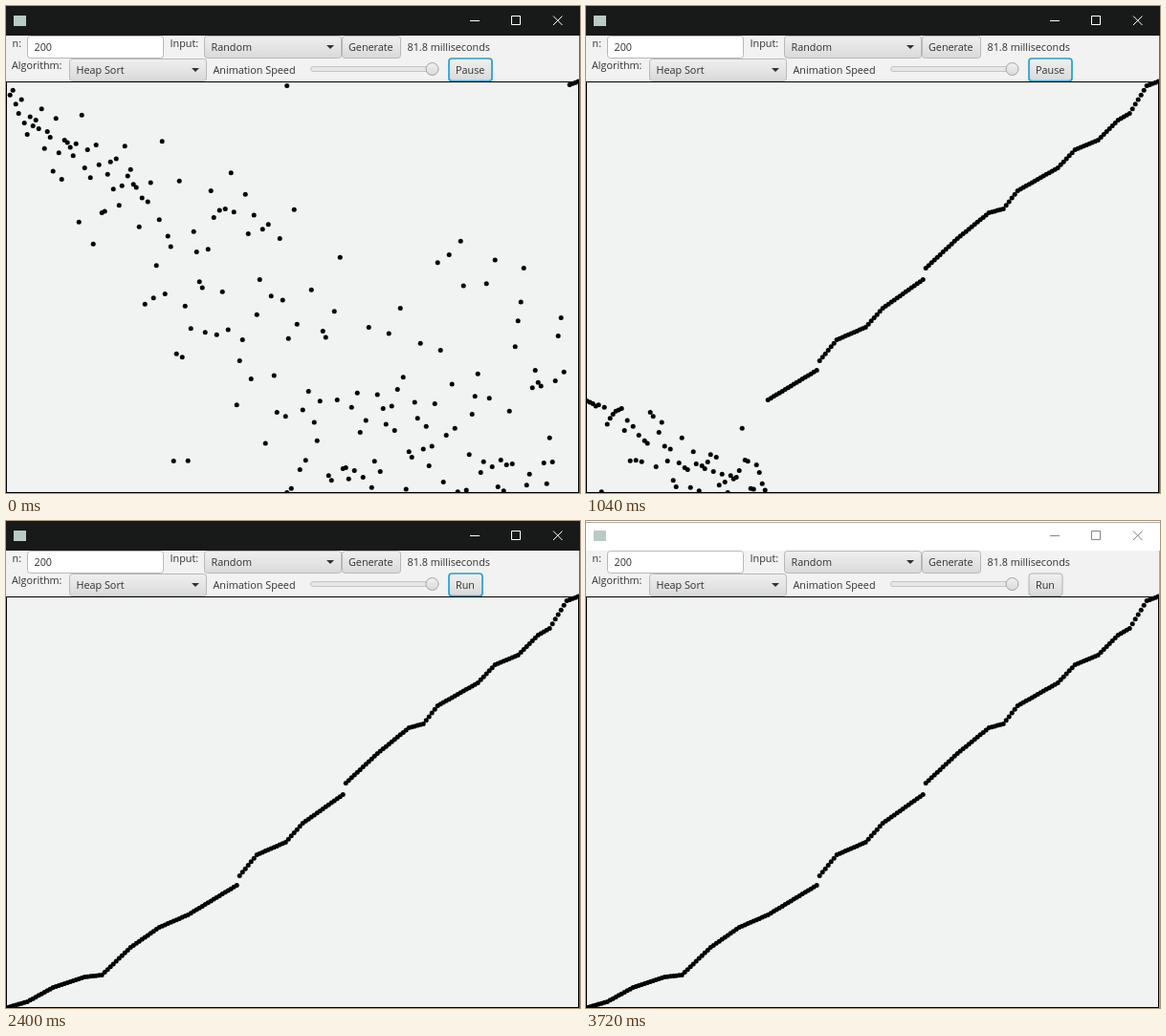
An HTML page with a canvas that plays this animation: 600 px wide and 510 px high, repeating every 3.76 s.

```html
<!DOCTYPE html>
<html lang="en">
<head>
<meta charset="utf-8">
<title>Heap Sort</title>
<style>
  html, body { margin: 0; width: 600px; height: 510px; overflow: hidden; }
  canvas { display: block; }
</style>
</head>
<body>
<canvas width="600" height="510"></canvas>
<script>
const ctx = document.querySelector('canvas').getContext('2d');
const LOOP = 3760, TICK = 40, BLUR_AT = 3600, COUNT = 200;

// Piecewise linear curve through [x, y] points
function curve(points, x) {
  let i = 0;
  while (i < points.length - 2 && x > points[i + 1][0]) i++;
  const [[x0, y0], [x1, y1]] = points.slice(i, i + 2);
  return y0 + (y1 - y0) * (x - x0) / (x1 - x0);
}

let seed = 11;
const random = () => (seed = seed * 16807 % 2147483647) / 2147483647;

// Height of the dots once sorted; a smaller y is a larger value.
const slope = [
  [0, 509], [7, 503], [16, 488], [27, 477], [33, 475], [43, 446], [53, 425], [63, 412],
  [80, 381], [81, 371], [87, 349], [97, 336], [103, 316], [117, 286], [118, 274], [129, 243],
  [140, 216], [145, 212], [150, 193], [164, 169], [170, 150], [178, 140], [185, 119],
  [189, 112], [195, 83], [199, 78.5]
];
const heap = Array.from({ length: COUNT }, (_, i) => curve(slope, i));

const swaps = [];
function swap(a, i, j) {
  [a[i], a[j]] = [a[j], a[i]];
  swaps.push([i, j]);
}
function siftDown(a, i, size) {
  for (let child; (child = 2 * i + 1) < size; i = child) {
    if (child + 1 < size && a[child + 1] < a[child]) child++;
    if (a[child] >= a[i]) return;
    swap(a, i, child);
  }
}

for (let i = COUNT - 1; i > 0; i--) swap(heap, i, Math.floor(random() * (i + 1)));
for (let i = COUNT / 2 - 1; i >= 0; i--) siftDown(heap, i, COUNT);
swaps.length = 0;

// Sort once, noting how many swaps each dot's final placement took.
const work = heap.slice(), placed = [];
for (let end = COUNT - 1; end > 0; end--) {
  swap(work, 0, end);
  placed[end] = swaps.length;
  siftDown(work, 0, end);
}

// The loop opens halfway through placing dot 195.
const first = placed[195] - .5, late = placed[63] + 2;
const sortEnd = 1040 * (swaps.length - first) / (late - first);
const pace = [
  [0, first], [320, placed[159] + 2], [640, placed[118] + 4], [1040, late], [sortEnd, swaps.length]
];

function drawDots(t) {
  const step = Math.min(curve(pace, t), swaps.length);
  const done = Math.floor(step), part = step - done;
  const dots = heap.slice();
  for (const [i, j] of swaps.slice(0, done)) [dots[i], dots[j]] = [dots[j], dots[i]];
  const [from, to] = swaps[done] || [0, 0];
  ctx.fillStyle = '#000';
  dots.forEach((y, i) => {
    const shift = i === from ? to - from : i === to ? from - to : 0;
    ctx.beginPath();
    ctx.arc(1.2 + 3 * (i + shift * part), y + .5, 2.5, 0, 7);
    ctx.fill();
  });
}

function rect(x, y, w, h, fill) {
  ctx.fillStyle = fill;
  ctx.fillRect(x, y, w, h);
}
function shade(y, h) {
  const g = ctx.createLinearGradient(0, y, 0, y + h);
  g.addColorStop(0, '#f0f0f0');
  g.addColorStop(1, '#d8d9d8');
  return g;
}
function box(x, y, w, h, fill = shade(y, h), stroke = '#b7b8b7', line = 1) {
  ctx.beginPath();
  ctx.roundRect(x + .5, y + .5, w - 1, h - 1, 3);
  ctx.fillStyle = fill;
  ctx.fill();
  ctx.strokeStyle = stroke;
  ctx.lineWidth = line;
  ctx.stroke();
}
function text(label, x, y) {
  ctx.fillStyle = '#303030';
  ctx.fillText(label, x, y);
}
function combo(label, x, y) {
  box(x, y, 144, 24);
  text(label, x + 7.5, y + 16);
  ctx.beginPath();
  ctx.moveTo(x + 128, y + 10);
  ctx.lineTo(x + 136, y + 10);
  ctx.lineTo(x + 132, y + 14);
  ctx.fill();
}

function drawTitleBar(focused) {
  rect(0, 0, 600, 31, focused ? '#181a19' : '#fff');
  if (!focused) rect(0, 1, 600, 1, '#aaa');
  rect(8, 10, 13, 11, '#b9cbc6');
  ctx.strokeStyle = focused ? '#fff' : '#858585';
  ctx.lineWidth = 1;
  ctx.beginPath();
  ctx.moveTo(485, 15.5); ctx.lineTo(495, 15.5);
  ctx.rect(528.5, 10.5, 9, 9);
  ctx.moveTo(572, 10.5); ctx.lineTo(581.5, 20);
  ctx.moveTo(581.5, 10.5); ctx.lineTo(572, 20);
  ctx.stroke();
}

function drawControls(running, focused) {
  rect(0, 31, 600, 48, '#f1f2f1');
  ctx.font = '10.8px "Open Sans", "Noto Sans", sans-serif';
  text('n:', 6.5, 43);
  box(22, 31, 143, 24, '#fff');
  text('200', 29.5, 47);
  text('Input:', 171.5, 43);
  combo('Random', 207, 31);
  box(351, 31, 62, 24);
  text('Generate', 358, 47);
  text('81.8 milliseconds', 419.5, 47);
  text('Algorithm:', 6, 66);
  combo('Heap Sort', 66, 55);
  text('Animation Speed', 216.5, 71);
  box(318, 63, 134, 6, '#e6e7e6', '#c4c5c4');
  ctx.beginPath();
  ctx.arc(445.5, 66, 6.5, 0, 7);
  ctx.fillStyle = shade(60, 13);
  ctx.fill();
  ctx.strokeStyle = '#a2a3a2';
  ctx.stroke();
  box(462.5, 54.5, running ? 46 : 36, 24.5, shade(55, 24), focused ? '#279fce' : '#a9b4ba', focused ? 1.7 : 1);
  text(running ? 'Pause' : 'Run', 470, 71);
}

function draw() {
  const now = performance.now() % LOOP, t = now - now % TICK;
  const focused = t < BLUR_AT;
  drawTitleBar(focused);
  drawControls(t < sortEnd, focused);
  rect(0, 79, 599, 431, '#000');
  rect(1, 80, 597, 429, '#f0f3f1');
  drawDots(t);
  rect(599, 31, 1, 479, focused ? '#666' : '#aaa');
  requestAnimationFrame(draw);
}
draw();
</script>
</body>
</html>
```
